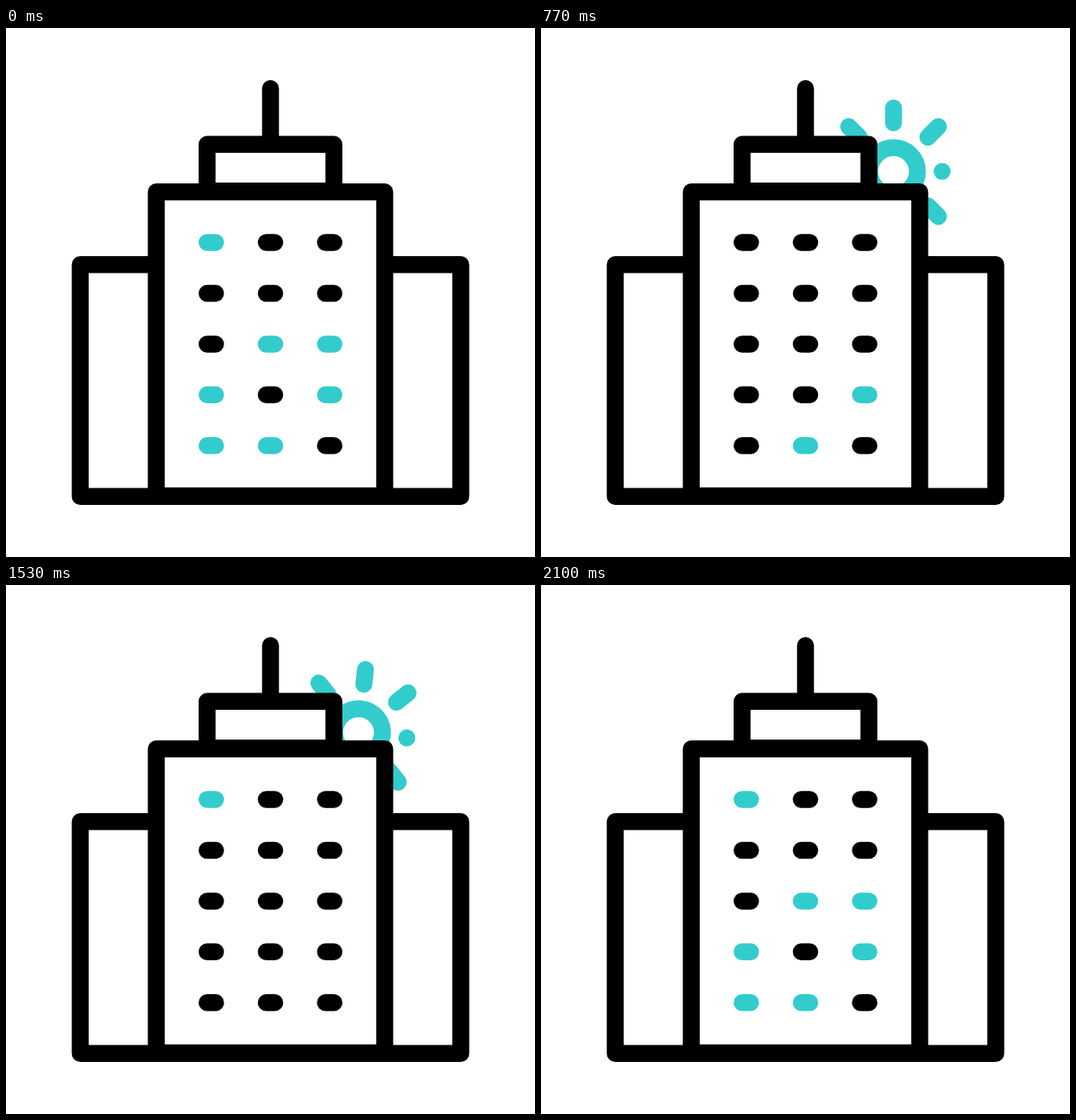
Recreate the animation shown at these times as an HTML page. Size 640 by 640 pixels, loop 2.5 s.

```html
<!DOCTYPE html>
<html lang="en">
<head>
<meta charset="utf-8">
<title>City building, night to day</title>
<style>
  html, body { margin: 0; width: 100%; height: 100%; overflow: hidden; background: #fff; }
  svg { display: block; width: 100%; height: 100%; }
  svg * { stroke-width: 20.5; stroke-linecap: round; stroke-linejoin: round; }
  #sun { fill: none; stroke: #3cc; }
  #building { fill: #fff; stroke: #000; }
</style>
</head>
<body>
<svg viewBox="0 0 640 640">
  <g id="sun"><circle r="28.9"/></g>
  <g id="building">
    <path d="M89.8 286.2H550.2V566.8H89.8Z"/>
    <path d="M320 73.3V140"/>
    <path d="M243.3 140.8H396.7V197.3H243.3Z"/>
    <path d="M181.8 198.2H458.2V566H181.8Z"/>
  </g>
  <g id="windows"></g>
</svg>
<script>
const FPS = 30, LOOP = 2500;
const SUN_X = 426.5, SUN_Y = 173.6, DROP = 67, TURN = 85;
const RAY_START = 58.8, RAY_LENGTH = 18;

const sun = document.getElementById('sun');
const windowGroup = document.getElementById('windows');

function add(parent, tag, attributes) {
  const node = document.createElementNS('http://www.w3.org/2000/svg', tag);
  for (const key in attributes) node.setAttribute(key, attributes[key]);
  return parent.appendChild(node);
}

// Smooth 0 to 1 between two frames.
function ease(frame, from, to) {
  const p = Math.min(1, Math.max(0, (frame - from) / (to - from)));
  return p * p * (3 - 2 * p);
}

// 0 outside, 1 between the rise and the fall.
const pulse = (frame, [riseFrom, riseTo, fallFrom, fallTo]) =>
  ease(frame, riseFrom, riseTo) - ease(frame, fallFrom, fallTo);

// Grow and shrink times, clockwise from the top; the right ray is a dot by day.
const upper = [18, 20, 48, 54.5], lower = [18, 20.9, 50, 55], left = [18, 20, 46, 51.5];
const rays = [upper, upper, [16, 19, 46, 50], lower, left, left, left, left].map((times, i) => ({
  times,
  dayDot: i === 2,
  node: add(sun, 'line', { y1: -RAY_START, transform: `rotate(${i * 45})` })
}));

// Frames at which a lit window goes dark and lights up again, by "row,column".
const lightTimes = {
  '0,0': [12, 42],
  '2,1': [16, 63],
  '2,2': [12, 47],
  '3,0': [19, 58],
  '3,2': [29, 55],
  '4,0': [23, 53],
  '4,1': [26, 57]
};
const windows = [];
for (let row = 0; row < 5; row++) {
  for (let column = 0; column < 3; column++) {
    const x = 248.4 + 71.6 * column, y = 259.6 + 61.4 * row;
    windows.push({
      times: lightTimes[`${row},${column}`],
      node: add(windowGroup, 'path', { d: `M${x - 5.1} ${y}h10.2` })
    });
  }
}

function draw(frame) {
  const drop = DROP * (1 - pulse(frame, [13, 21.1, 43, 61]));
  const turn = TURN * (1 - pulse(frame, [13, 21.8, 43, 61]));
  sun.setAttribute('transform', `translate(${SUN_X} ${SUN_Y + drop}) rotate(${turn})`);

  for (const { times, dayDot, node } of rays) {
    const out = pulse(frame, times);
    const length = RAY_LENGTH * (dayDot ? 1 - out : out);
    node.setAttribute('y2', -RAY_START - length);
    node.style.display = dayDot || length > 0 ? '' : 'none';
  }

  for (const { times, node } of windows) {
    const lit = times && (frame < times[0] || frame >= times[1]);
    node.setAttribute('stroke', lit ? '#3cc' : '#000');
  }
}

function tick() {
  const time = performance.now() % LOOP;
  draw(Math.floor((time + 5) * FPS / 1000));
  requestAnimationFrame(tick);
}
tick();
</script>
</body>
</html>
```
